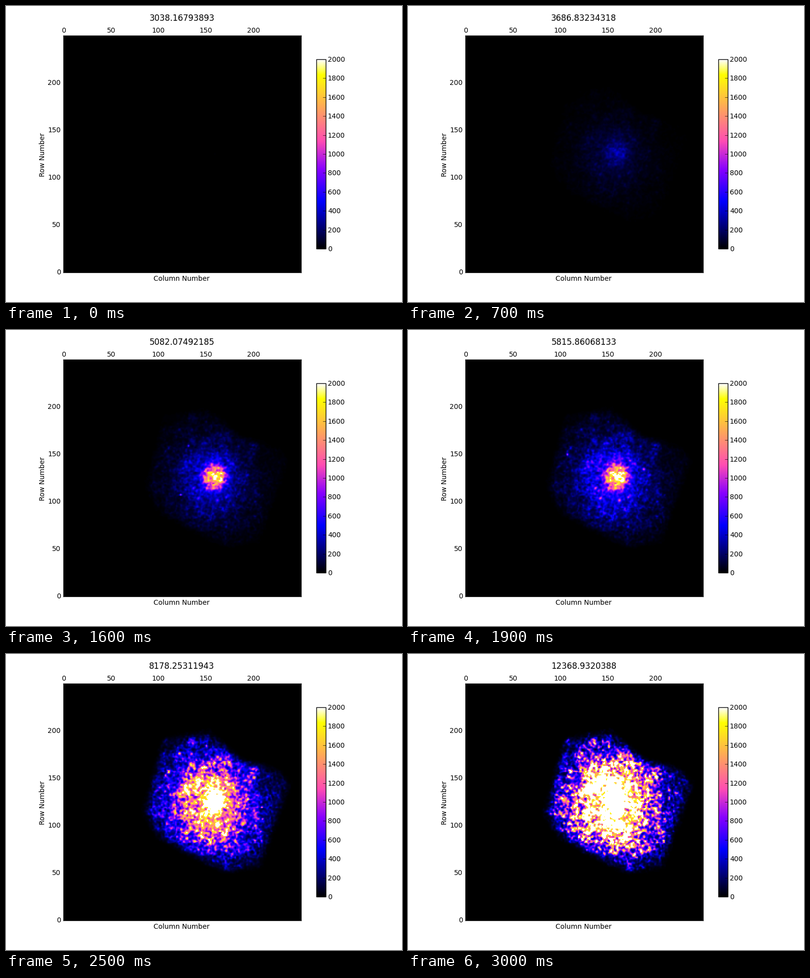
Write a matplotlib script that moves like this. It is 800x600 px and loops after 3100 ms.

```python
import numpy as np
import matplotlib.pyplot as plt
from matplotlib.animation import FuncAnimation
from matplotlib.path import Path
from matplotlib.textpath import TextPath

W, H, DPI = 800, 600, 100
FRAMES, INTERVAL = 31, 100
SIZE, VMAX = 250, 2000
LEFT, TOP, SIDE = 116, 60, 480
BAR_LEFT, BAR_TOP, BAR_W, BAR_H = 627, 108, 19.2, 384
PAD = 4 * DPI / 72

plt.style.use("classic")
rng = np.random.default_rng(12)
row, col = np.mgrid[0:SIZE, 0:SIZE].astype(float)


def blur(img, sigma):
    f = np.fft.fftfreq(SIZE)
    kernel = np.exp(-2 * (np.pi * sigma) ** 2 * (f[:, None] ** 2 + f ** 2))
    return np.fft.ifft2(np.fft.fft2(img) * kernel).real


def noise_field(sigma):
    n = blur(rng.standard_normal((SIZE, SIZE)), sigma)
    return n / n.std()


def grain():
    return 0.9 * noise_field(0.9) + 0.45 * noise_field(3)


def bump(x, y, width, power=2.0, stretch=1.0):
    r = np.hypot(col - x, (row - y) / stretch)
    return np.exp(-(r / width) ** power)


def rise(k, middle, width):
    return 1 / (1 + np.exp((middle - k) / width))


# Corners of the lit area, softened at the rim
corners = [(85, 112), (106, 190), (152, 198), (184, 169), (226, 157),
           (237, 145), (205, 56), (170, 52), (101, 88)]
points = np.column_stack([col.ravel(), row.ravel()])
inside = Path(corners).contains_points(points).reshape(SIZE, SIZE)
mask = np.clip(blur(inside.astype(float), 3.5), 0, 1) ** 1.4

core = bump(158.5, 125.5, 13.5, 4)
mid = bump(157, 125, 24) * mask
halo = (0.12 + bump(153, 121, 42, 2.5, 1.12) + 0.5 * bump(198, 157, 8)
        + 0.25 * bump(166, 165, 8) + 0.25 * bump(145, 142, 10)) * mask
contrast = 0.2 + 0.25 * (1 - bump(156, 124, 45))
early, late = grain(), grain()


def sparks(k):
    """A few hot pixels that jump about from frame to frame."""
    spots = np.random.default_rng(k)
    img = np.zeros((SIZE, SIZE))
    for _ in range(k // 8):
        angle, dist = spots.uniform(0, 2 * np.pi), spots.uniform(20, 60)
        x, y = 157 + dist * np.cos(angle), 122 + dist * np.sin(angle)
        img += 50 * k * bump(x, y, spots.uniform(1, 1.8))
    return img * mask


def intensity(k):
    t = k / (FRAMES - 1)
    turn = 1.2 * t ** 4
    noise = np.cos(turn) * early + np.sin(turn) * late
    spread = contrast * (1 + 0.45 * t ** 6)
    base = (1100 * rise(k, 10, 1.5) * core + 350 * rise(k, 9, 2) * mid
            + (2600 * rise(k, 25.5, 2.7) + 8 * k) * halo)
    return base * np.exp(spread * noise - spread ** 2 / 2) + sparks(k)


def heading(k):
    mean = (120900 / (40.3 - k) + 120900 / (39.3 - k)) / 2
    return f"{mean:.12g}"


def box(x, y, w, h):
    return [x / W, 1 - (y + h) / H, w / W, h / H]


def ink_shift(string, size, anchor):
    """Distance in pixels from the text origin to a point of its inked box."""
    ink = TextPath((0, 0), string, size=size * DPI / 72).get_extents()
    return ink.x0 + anchor * ink.width + 0.5


def write(x, y, string, size=10, anchor=0.5, rotation=0):
    """Put the inked box at pixel (x, y); anchor 0 is its left, 1 its right."""
    shift = ink_shift(string, size, anchor)
    x, y = (x, y + shift) if rotation else (x - shift, y)
    return fig.text(x / W, 1 - y / H, string, size=size, rotation=rotation,
                    rotation_mode="anchor", ha="left", va="baseline")


fig = plt.figure(figsize=(W / DPI, H / DPI), dpi=DPI, facecolor="white")
ax = fig.add_axes(box(LEFT, TOP, SIDE, SIDE))
image = ax.imshow(intensity(0), cmap="gnuplot2", vmin=0, vmax=VMAX,
                  origin="lower", interpolation="nearest", aspect="auto")
ax.tick_params(labelleft=False, labelbottom=False)

bar = fig.colorbar(image, cax=fig.add_axes(box(BAR_LEFT, BAR_TOP, BAR_W, BAR_H)),
                   ticks=range(0, VMAX + 1, 200))
bar.ax.tick_params(labelright=False)

for n in range(0, 201, 50):
    offset = (n + 0.5) * SIDE / SIZE
    write(LEFT + offset, TOP - 6, str(n))
    write(LEFT - PAD, TOP + SIDE - offset + 5, str(n), anchor=1)
for n in range(0, VMAX + 1, 200):
    y = BAR_TOP + BAR_H * (1 - n / VMAX)
    write(BAR_LEFT + BAR_W + PAD, y + 5, str(n), anchor=0)

center = LEFT + SIDE / 2
title = write(center, 30, heading(0), size=12)
write(center, 557, "Column Number")
write(78, H / 2, "Row Number", rotation=90)


def update(k):
    image.set_data(intensity(k))
    title.set_text(heading(k))
    title.set_x((center - ink_shift(heading(k), 12, 0.5)) / W)
    return image, title


anim = FuncAnimation(fig, update, frames=FRAMES, interval=INTERVAL, repeat=True)
plt.show()
```
